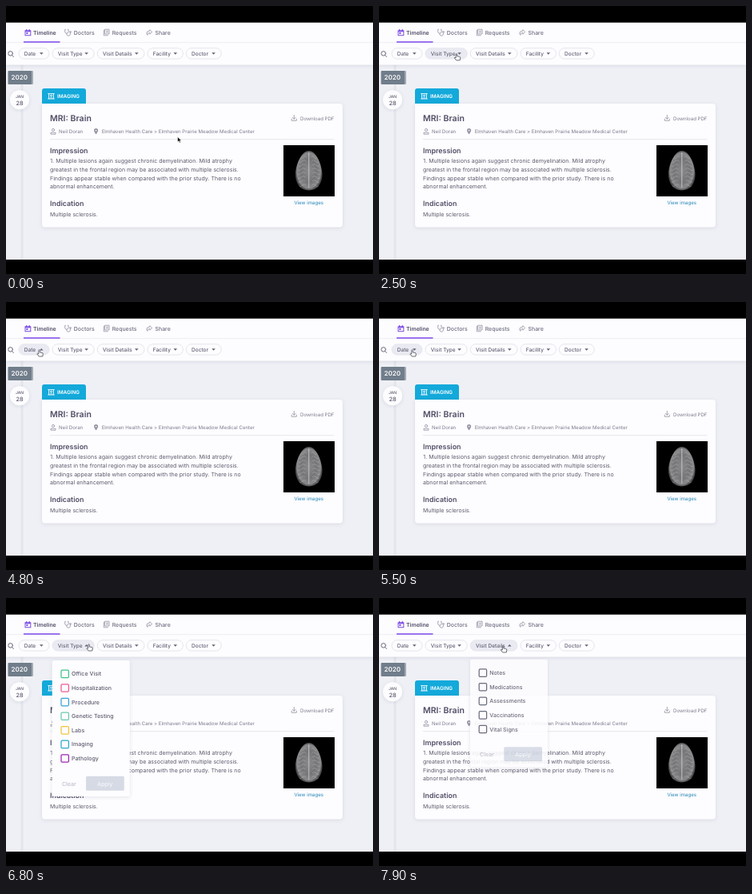
Write an HTML page that moves like this. It is 459x335 px and loops after 8 s.

```html
<!DOCTYPE html>
<html lang="en">
<head>
<meta charset="utf-8">
<title>Health timeline</title>
<style>
  html, body { margin: 0; width: 100%; height: 100%; overflow: hidden; background: #000; }
  svg { display: block; width: 459px; height: 335px; }
  text { font-family: Inter, "Open Sans", sans-serif; font-size: 7.04px; fill: #5b5a6c; text-rendering: geometricPrecision; white-space: pre; }
  .nav { font-size: 6.95px; font-weight: 500; fill: #6c6c80; }
  .on { font-size: 6.95px; font-weight: 600; fill: #514d68; }
  .pill rect { fill: #fdfcfe; stroke: #dfe0e7; stroke-width: .8; }
  .pill.hover rect { fill: #e9eaf2; stroke: #e2e4ec; }
  .pill text { font-size: 6.55px; font-weight: 500; fill: #626175; }
  .pill path { fill: #626175; }
  .title { font-size: 10.55px; font-weight: 600; fill: #514d66; }
  .head { font-size: 8.88px; font-weight: 600; fill: #514d66; }
  .small { font-size: 6.1px; fill: #7b7b8d; }
  .item { font-weight: 500; fill: #5c5b6e; }
  .line { fill: none; stroke: #9393a4; stroke-width: .8; stroke-linecap: round; stroke-linejoin: round; }
  .mid { text-anchor: middle; }
</style>
</head>
<body>
<svg viewBox="0 0 459 335" xmlns="http://www.w3.org/2000/svg">
  <defs>
    <radialGradient id="scan" cy=".5">
      <stop offset="0" stop-color="#8b8b8d"/>
      <stop offset=".6" stop-color="#757577"/>
      <stop offset=".88" stop-color="#8a8a8c"/>
      <stop offset="1" stop-color="#4a4a4c"/>
    </radialGradient>
    <filter id="soft" x="-10%" y="-10%" width="120%" height="125%">
      <feDropShadow dx="0" dy="1" stdDeviation="2" flood-color="#50587a" flood-opacity=".16"/>
    </filter>
  </defs>

  <rect width="459" height="335" fill="#eff0f5"/>
  <rect x="18.5" y="73" width="3" height="245" fill="#e4e6ec"/>

  <!-- top bars -->
  <g filter="url(#soft)"><rect y="20" width="459" height="53.5" fill="#fdfcfe"/></g>
  <path d="M0 45.7H459" stroke="#e9e9ef" stroke-width=".8"/>
  <rect x="22" y="44" width="45.5" height="2" fill="#9a74ee"/>
  <g fill="#7d4fe6">
    <path d="M23.5 30.2H25V29H26.2V30.2H28.6V29H29.8V30.2H31.3V37.2H23.5Z"/>
    <path d="M24.5 32.3H30.3V36.2H24.5Z" fill="#fdfcfe"/>
    <path d="M25.4 33H27.4V35H25.4Z"/>
  </g>
  <g class="line">
    <path d="M74.5 29.3H73.7V32A2.2 2.2 0 0 0 78.1 32V29.3H77.3M75.9 34.3V35A2.2 2.2 0 0 0 80.4 35V33.3"/>
    <circle cx="80.4" cy="32.4" r=".9"/>
    <path d="M123.2 30.3H122.3V36.8H127.3M124 29.2H129V35H124ZM125.4 31.2H127.6M125.4 33H127.6"/>
    <path d="M182.5 32.2L179.8 29.7V31.1Q175.8 31.3 175.8 34Q175.8 35.6 177 36.4Q176.6 33.5 179.8 33.4V34.8Z"/>
  </g>
  <text class="on" x="34" y="35.7">Timeline</text>
  <text class="nav" x="84.7" y="35.7">Doctors</text>
  <text class="nav" x="132.7" y="35.7">Requests</text>
  <text class="nav" x="186.5" y="35.7">Share</text>
  <path class="line" style="stroke:#5a596c;stroke-width:.9" d="M7.7 61.6L9.4 63.4M8.4 59.3A2.8 2.8 0 1 1 2.8 59.3A2.8 2.8 0 1 1 8.4 59.3"/>
  <g id="pills"></g>

  <!-- dates -->
  <rect x="4" y="81" width="30" height="17" rx="1" fill="#a4abb5"/>
  <rect x="2.5" y="81" width="29.5" height="17" rx="1" fill="#717d8a"/>
  <text x="16.7" y="92.3" class="mid" style="font-size:8px;font-weight:600;fill:#fafbfc">2020</text>
  <circle cx="17" cy="117.3" r="12" fill="#fdfcfe" filter="url(#soft)"/>
  <text x="17" y="115.4" class="mid" style="font-size:5px;font-weight:500">JAN</text>
  <text x="17" y="123.9" class="mid" style="font-size:7.4px;font-weight:500">28</text>

  <!-- record -->
  <path d="M45 124V106Q45 103 48 103H97Q100 103 100 106V124Z" fill="#13a9da"/>
  <g fill="none" stroke="#fff" stroke-width=".9">
    <path d="M52.3 109.6H60.7M52.3 116H60.7M53.6 109.6V116M59.4 109.6V116"/>
    <circle cx="56.5" cy="112.1" r="1"/><path d="M54.8 115.6Q56.5 112.6 58.2 115.6"/>
  </g>
  <text x="64" y="115.1" style="font-size:6.35px;font-weight:600;fill:#fff">IMAGING</text>
  <path d="M45 122H417Q421 122 421 126V272.5Q421 276.5 417 276.5H49Q45 276.5 45 272.5Z" fill="#fdfcfe" filter="url(#soft)"/>
  <text class="title" x="55" y="144.2">MRI: Brain</text>
  <path class="line" d="M360.3 136.3V141.2M358.3 139.4L360.3 141.3L362.3 139.4M357.3 141.2V143.3H363.3V141.2"/>
  <text class="small" x="368" y="142.6">Download PDF</text>
  <g class="line">
    <circle cx="59" cy="154.9" r="1.6"/><path d="M56 159.8V158.2H62V159.8Z"/>
  </g>
  <path fill="#9393a4" fill-rule="evenodd" d="M112.6 160.4Q110 157 110 155.6A2.6 2.6 0 0 1 115.2 155.6Q115.2 157 112.6 160.4ZM111.7 155.6A.9 .9 0 0 0 113.5 155.6A.9 .9 0 0 0 111.7 155.6Z"/>
  <text class="small" x="66" y="158.9">Neil Doran</text>
  <text class="small" x="119.7" y="158.9">Elmhaven Health Care &gt; Elmhaven Prairie Meadow Medical Center</text>
  <path d="M55 166.7H410.5" stroke="#e6e6ec" stroke-width=".9"/>
  <text class="head" x="55" y="183.8">Impression</text>
  <text x="55.3" y="196.3">1. Multiple lesions again suggest chronic demyelination. Mild atrophy</text>
  <text x="55" y="206.9">greatest in the frontal region may be associated with multiple sclerosis.</text>
  <text x="55" y="217.5">Findings appear stable when compared with the prior study. There is no</text>
  <text x="55" y="228.1">abnormal enhancement.</text>
  <text class="head" x="55" y="250.3">Indication</text>
  <text x="55" y="263.2">Multiple sclerosis.</text>
  <rect x="347" y="174" width="64" height="64"/>
  <path d="M378.8 181C387 180.5 394.5 196 395.5 209C396 222 389 230.5 378.8 230.5C368.5 230.5 361.6 222 362 209C363 196 370.5 180.5 378.8 181Z" fill="url(#scan)"/>
  <g id="folds" fill="none" stroke="#c2c2c4" stroke-width=".8" opacity=".5"></g>
  <path d="M378.8 183V227" stroke="#c4c4c6" stroke-width="1"/>
  <text class="small mid" x="378.7" y="248" style="fill:#2187b8">View images</text>

  <g id="menus"></g>
  <rect width="459" height="20.7"/>
  <rect y="317" width="459" height="18"/>

  <g id="cursor" stroke-linejoin="round">
    <path id="arrow" d="M0 0V6.6L1.6 5.2L2.7 7.6L3.9 7.1L2.9 4.8H5Z" fill="#111" stroke="#fff" stroke-width=".6"/>
    <path id="hand" d="M-1.7 4V.2Q-1 -.9 -.2 .2V3L2.6 3.4Q3.9 3.7 3.8 5L3.3 8H-1.3L-3.7 4.9Q-3.3 3.6 -1.7 5Z" fill="#fff" stroke="#4a4a55" stroke-width=".8"/>
  </g>
</svg>
<script>
const LOOP = 8000;
const $ = id => document.getElementById(id);

// label, left, right, [open, close]
const pills = [
  ["Date", 16, 54, [4700, 5400]],
  ["Visit Type", 58, 110.3, [6300, 7250]],
  ["Visit Details", 114.3, 173, [7650, LOOP]],
  ["Facility", 177, 221.5],
  ["Doctor", 225.3, 269.3]
].map(([label, left, right, open]) => ({ label, left, right, open }));

const ink = "#5a5d70";
const menus = [
  { x: 57.8, fade: [6350, 6550, 7250, 7400], items: [
    ["Office Visit", "#3fc48a"], ["Hospitalization", "#ee5c92"], ["Procedure", "#35a3d8"],
    ["Genetic Testing", "#6ac9ab"], ["Labs", "#efc53a"], ["Imaging", "#2ba9cc"], ["Pathology", "#9c27b0"]] },
  { x: 114, fade: [7740, 7920, LOOP, LOOP + 150], items:
    ["Notes", "Medications", "Assessments", "Vaccinations", "Vital Signs"].map(s => [s, ink]) }
];

// time, x, y of the pointer tip
const path = [
  [0, 214.5, 163.5], [400, 214.5, 163.5], [1300, 59, 90.5], [1600, 59, 90.5],
  [2000, 40, 60], [3400, 238, 59.5], [3800, 238, 59.5], [4500, 42.5, 60],
  [5700, 42.5, 60], [6150, 104.5, 58], [7200, 104.5, 58], [7550, 156, 60], [LOOP, 156, 60]
];

$("pills").innerHTML = pills.map(p => `<g class="pill">
  <rect x="${p.left}" y="52.7" width="${p.right - p.left}" height="13.4" rx="6.7"/>
  <text x="${p.left + 6.7}" y="61.7">${p.label}</text>
  <path d="M-2.3 -1.2H2.3L0 1.4Z"/></g>`).join("");
pills.forEach((p, i) => {
  p.el = $("pills").children[i];
  p.caret = p.el.querySelector("path");
});

const rowStep = 17.6;
function menuMarkup({ x, items }) {
  const height = items.length * rowStep + 46.8;
  const rows = items.map(([label, color], i) => {
    const y = 95 + i * rowStep;
    return `<rect x="${x + 11.2}" y="${y - 4.8}" width="9.4" height="9.4" rx="1.2" fill="#fdfcfe" stroke="${color}" stroke-width="1.25"/>
      <text class="item" x="${x + 24.3}" y="${y + 2.4}">${label}</text>`;
  }).join("");
  const y = 78 + height - 25.2;
  return `<g><rect x="${x}" y="78" width="97" height="${height}" rx="2" fill="#fdfcfe" filter="url(#soft)"/>${rows}
    <text class="item mid" x="${x + 21}" y="${y + 11.8}" style="fill:#bcc0cb">Clear</text>
    <rect x="${x + 42.3}" y="${y}" width="47.7" height="18" rx="1.5" fill="#d5dae5"/>
    <text class="item mid" x="${x + 66}" y="${y + 11.8}" style="fill:#f7f8fb">Apply</text></g>`;
}
$("menus").innerHTML = menus.map(menuMarkup).join("");
menus.forEach((m, i) => m.el = $("menus").children[i]);

// mirrored brain folds
$("folds").innerHTML = [-1, 1].map(side => Array.from({ length: 8 }, (_, i) => {
  const y = 189 + i * 5;
  const reach = 15 * Math.sqrt(1 - ((y - 209) / 27) ** 2);
  const at = k => 378.8 + side * reach * k;
  return `<path d="M${at(.3)} ${y}Q${at(.45)} ${y - 3} ${at(.65)} ${y}T${at(.95)} ${y + 1}"/>`;
}).join("")).join("");

const clamp = v => Math.max(0, Math.min(1, v));
const ease = v => v * v * (3 - 2 * v);

function pointerAt(t) {
  const i = Math.max(1, path.findIndex(p => p[0] > t));
  const [t0, x0, y0] = path[i - 1], [t1, x1, y1] = path[i];
  const k = ease(clamp((t - t0) / (t1 - t0)));
  return [x0 + (x1 - x0) * k, y0 + (y1 - y0) * k];
}

function draw(t) {
  const [x, y] = pointerAt(t);
  let over = false;
  for (const p of pills) {
    const hover = x >= p.left && x <= p.right && y > 52.7 && y < 66;
    const open = p.open && t >= p.open[0] && t < p.open[1];
    over = over || hover;
    p.el.classList.toggle("hover", hover);
    p.caret.setAttribute("transform", `translate(${p.right - 9.7} 59.4) scale(1 ${open ? -1 : 1})`);
  }
  for (const { el, fade: [a, b, c, d] } of menus) {
    const o = Math.min(clamp((t - a) / (b - a)), clamp((d - t) / (d - c)));
    el.setAttribute("opacity", o);
    el.setAttribute("transform", `translate(0 ${-12 * (1 - o)})`);
  }
  $("cursor").setAttribute("transform", `translate(${x} ${y})`);
  $("arrow").style.display = over ? "none" : "";
  $("hand").style.display = over ? "" : "none";
}

const start = performance.now();
function tick() {
  draw((performance.now() - start) % LOOP);
  requestAnimationFrame(tick);
}
tick();
</script>
</body>
</html>
```
